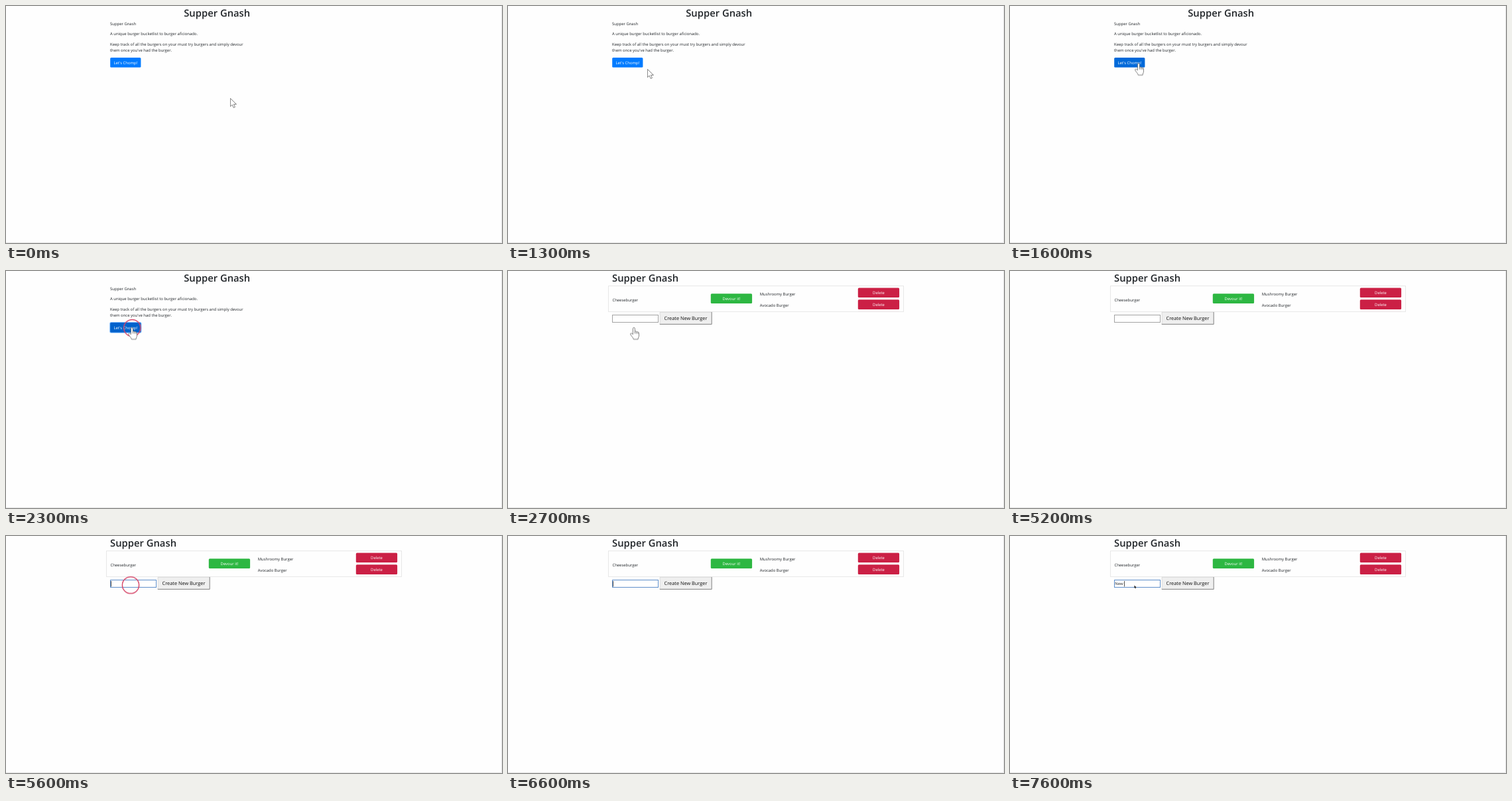
Recreate the animation shown at these times as an HTML page. Size 748 by 358 pixels, loop 8 s.

```html
<!DOCTYPE html>
<html lang="en">
<head>
<meta charset="utf-8">
<title>Supper Gnash</title>
<style>
html, body { margin: 0; width: 100%; height: 100%; overflow: hidden; background: #fefefe; }
svg { display: block; width: 748px; height: 358px; }
text {
  font: 5.93px "Open Sans", sans-serif;
  fill: #212529;
  text-rendering: geometricPrecision;
  white-space: pre;
}
.title { font-size: 14.8px; font-weight: 600; }
.label { fill: #fff; text-anchor: middle; }
.big { font-size: 7.35px; text-anchor: middle; fill: #111; }

/* Everything moves in hard steps: 1.25% is 100 ms */
.s { animation: 8s step-end infinite; }
.home { animation-name: home; }
.list { animation-name: list; }
.go { animation-name: go; }
.arrow { animation-name: arrow; }
.hand { animation-name: hand; }
.ring { animation-name: ring; }
.box { animation-name: box; }
.caret { animation-name: caret; }
.n { animation-name: keyN; }
.e { animation-name: keyE; }
.w { animation-name: keyW; }
.dot { animation-name: dot; }

@keyframes home { 0% { opacity: 1 } 33.75%, 100% { opacity: 0 } }
@keyframes list { 0% { opacity: 0 } 33.75%, 100% { opacity: 1 } }
@keyframes go {
  0% { fill: #007bff; stroke: transparent }
  17.5% { fill: #0069d9; stroke: transparent }
  26.25%, 100% { fill: #0062cc; stroke: rgba(0,123,255,.5) }
}
@keyframes arrow {
  0% { transform: translate(338px,139px); opacity: 1 }
  11.25% { transform: translate(308px,128px); opacity: 1 }
  12.5% { transform: translate(262px,114px); opacity: 1 }
  13.75% { transform: translate(232px,105px); opacity: 1 }
  16.25% { transform: translate(210px,95px); opacity: 1 }
  17.5%, 100% { transform: translate(210px,95px); opacity: 0 }
}
@keyframes hand {
  0% { transform: translate(201px,90px); opacity: 0 }
  17.5% { transform: translate(201px,90px); opacity: 1 }
  18.75% { transform: translate(197px,88px); opacity: 1 }
  20% { transform: translate(194px,86.5px); opacity: 1 }
  21.25% { transform: translate(191px,85.7px); opacity: 1 }
  22.5% { transform: translate(190px,85.3px); opacity: 1 }
  52.5% { transform: translate(191px,75.3px); opacity: 0 }
  63.75% { transform: translate(191px,75.3px); opacity: 1 }
  65%, 100% { transform: translate(191px,75.3px); opacity: 0 }
}
@keyframes ring {
  0% { transform: translate(190.3px,86px); r: 5px; opacity: 0 }
  26.25% { transform: translate(190.3px,86px); r: 5px; opacity: 1 }
  27.5% { transform: translate(190.3px,86px); r: 9px; opacity: 1 }
  28.75% { transform: translate(190.3px,86px); r: 12.6px; opacity: 1 }
  33.75% { transform: translate(188px,74.2px); r: 8px; opacity: 0 }
  68.75% { transform: translate(188px,74.2px); r: 8px; opacity: 1 }
  70% { transform: translate(188px,74.2px); r: 12.6px; opacity: 1 }
  72.5%, 100% { transform: translate(188px,74.2px); r: 12.6px; opacity: 0 }
}
@keyframes box { 0% { stroke: #a3a3a3 } 68.75%, 100% { stroke: #5f8fcb } }
@keyframes caret {
  0% { transform: none; opacity: 0 }
  68.75% { transform: none; opacity: 1 }
  75% { transform: none; opacity: 0 }
  82.5% { transform: none; opacity: 1 }
  88.75% { transform: translateX(4.5px); opacity: 1 }
  91.25% { transform: translateX(7.8px); opacity: 1 }
  92.5% { transform: translateX(12.4px); opacity: 1 }
  93.75%, 100% { transform: translateX(14px); opacity: 1 }
}
@keyframes keyN { 0% { opacity: 0 } 88.75%, 100% { opacity: 1 } }
@keyframes keyE { 0% { opacity: 0 } 91.25%, 100% { opacity: 1 } }
@keyframes keyW { 0% { opacity: 0 } 92.5%, 100% { opacity: 1 } }
@keyframes dot { 0% { opacity: 0 } 95%, 100% { opacity: 1 } }
</style>
</head>
<body>
<svg viewBox="0 0 748 358">
  <path d="M747.5 0V357.5H0" fill="none" stroke="#e6e6e6"/>

  <g class="s home">
    <text class="title" x="268.2" y="15.5">Supper Gnash</text>
    <text x="157" y="28.8">Supper Gnash</text>
    <text x="157" y="44.4">A unique burger bucketlist to burger aficionado.</text>
    <text x="157" y="60">Keep track of all the burgers on your must try burgers and simply devour</text>
    <text x="157" y="69.4">them once you've had the burger.</text>
    <rect class="s go" x="157.2" y="78" width="46.2" height="14.8" rx="1.5" stroke-width="2" paint-order="stroke"/>
    <text class="label" x="180.3" y="87.6">Let's Chomp!</text>
  </g>

  <g class="s list">
    <text class="title" x="157" y="15.5">Supper Gnash</text>
    <rect x="151.5" y="22.5" width="445" height="39" fill="none" stroke="#e8e8e8"/>
    <text x="157.4" y="45.6">Cheeseburger</text>
    <text x="379.7" y="36.6">Mushroomy Burger</text>
    <text x="379.7" y="54.4">Avocado Burger</text>
    <g id="buttons">
      <rect x="305.8" y="34.3" width="62.3" height="14.7" rx="1.5" fill="#2db742"/>
      <rect x="527.8" y="25.4" width="62.3" height="14.7" rx="1.5" fill="#cb2045"/>
      <rect x="527.8" y="43.2" width="62.3" height="14.7" rx="1.5" fill="#cb2045"/>
      <text class="label" x="337" y="43.9">Devour it!</text>
      <text class="label" x="559" y="35">Delete</text>
      <text class="label" x="559" y="52.8">Delete</text>
    </g>
    <rect class="s box" x="157.5" y="66.5" width="69" height="11" fill="#fff"/>
    <text x="158.2" y="74.3"><tspan></tspan></text>
    <text class="s n" x="158.2" y="74.3">N</text>
    <text class="s e" x="162.67" y="74.3">e</text>
    <text class="s w" x="166" y="74.3">w</text>
    <path class="s caret" d="M158.5 68V76.5" stroke="#222" stroke-width=".8"/>
    <rect x="228.8" y="62" width="78.8" height="18.8" fill="#efefef"/>
    <path d="M229.1 80.5V62.3H307" fill="none" stroke="#d4d4d4" stroke-width=".7"/>
    <path d="M228.8 80.4H307.2V62" fill="none" stroke="#777" stroke-width=".9"/>
    <text class="big" x="268" y="74.4">Create New Burger</text>
    <path class="s dot" d="M187.6 74.4V79L188.6 78.1L189.3 79.6L190 79.2L189.3 77.8H190.6Z" fill="#111"/>
  </g>

  <circle class="s ring" fill="none" stroke="#d6486a" stroke-width="1.5"/>
  <g fill="#fff" stroke="#555" stroke-width=".75" stroke-linejoin="round">
    <path class="s arrow" d="M.4.5V12.8L3.2 10.2L5.3 14.7L7.4 13.7L5.4 9.4H9.4Z"/>
    <path class="s hand" d="M-1.6 10.4V1.7A1.5 1.5 0 0 1 1.4 1.7V6.2C1.9 5.3 3.7 5.6 3.8 6.7C4.4 6 5.9 6.4 6 7.4C6.7 7 7.6 7.5 7.6 8.6V12C7.6 14.4 6.2 15 6 17.9H-.7C-.8 15.6-3.5 13.7-5.2 10.7C-6 9.1-4.2 8.2-3.1 9.2ZM1.4 6.2V9.3M3.8 6.7V9.5M6 7.4V9.7"/>
  </g>
</svg>
</body>
</html>
```
